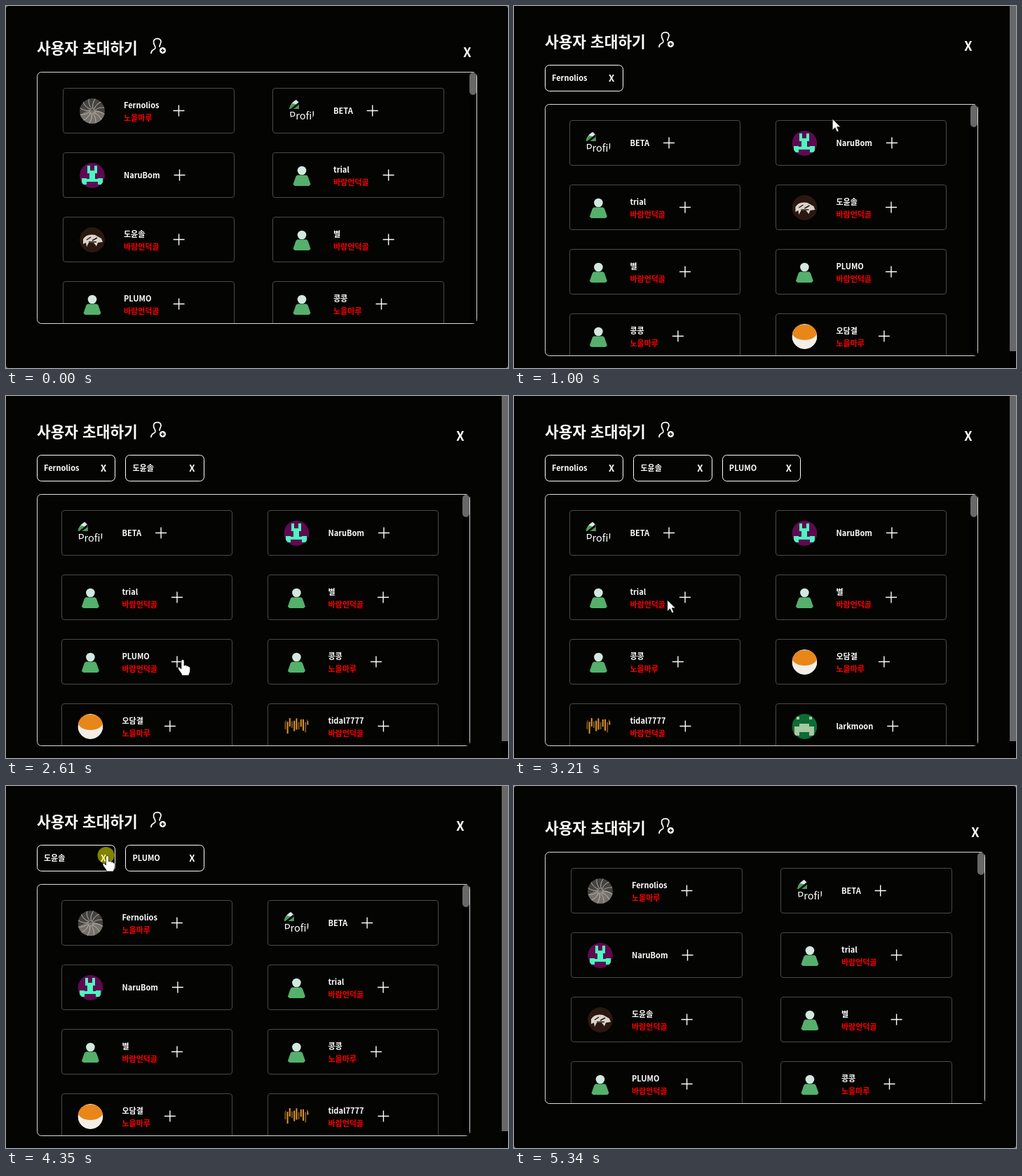
These frames come from a looping animation (716x517 px, 5940 ms). An HTML page:

```html
<!DOCTYPE html>
<html lang="ko">
<head>
<meta charset="utf-8">
<title>사용자 초대하기</title>
<style>
  html, body { margin: 0; width: 100%; height: 100%; overflow: hidden; background: #040402; }
  svg { display: block; }
  text { font-family: "Noto Sans CJK KR", "Noto Sans KR", "Noto Sans CJK", "Noto Sans", sans-serif; fill: #fff; }
  .bold { font-weight: 700; }
  .small { font-size: 11px; }
  .house { fill: #f00; }
  .line { fill: none; stroke: #fff; }
</style>
</head>
<body>
<svg width="716" height="517" viewBox="0 0 716 517">
  <defs><clipPath id="disc"><circle r="18"/></clipPath></defs>
  <g id="page"></g>
  <circle id="press" r="12" fill="#ff0" fill-opacity=".5"/>
  <g id="cursor" fill="#fff" stroke="#000" stroke-width=".6">
    <path id="arrow" d="M0 0V16l3.8-3.6 2.7 6 2.5-1.1-2.6-5.9H11.5z"/>
    <path id="hand" d="M-2 1.5a2 2 0 0 1 4 0V8l1-.3a2 2 0 0 1 2.8 1 2 2 0 0 1 2.8 1 1.7 1.7 0 0 1 2 1.6V15c0 3-1.6 4-1.8 7H-1C-1.5 18-6 15-6.5 12c-.3-2 2-2.3 3-.5L-2 13z"/>
  </g>
</svg>
<script>
const LOOP = 5940, STEP = 66.7, PRESS = 70, ROW = 92;
const $ = id => document.getElementById(id);
const range = (n, f) => Array.from({ length: n }, (_, i) => f(i)).join('');
const rect = (x, y, w, h, attrs = '') => `<rect x="${x}" y="${y}" width="${w}" height="${h}" ${attrs}/>`;
const text = (x, y, str, attrs) => `<text x="${x}" y="${y}" ${attrs}>${str}</text>`;

const pen = document.createElement('canvas').getContext('2d');
pen.font = '700 11px "Noto Sans CJK KR", "Noto Sans KR", "Noto Sans CJK", "Noto Sans", sans-serif';
const widest = (...lines) => Math.max(...lines.map(s => pen.measureText(s).width));

// Pixel avatar: the right half is given, the left half mirrors it
const pixels = (back, fore, half) => `<circle r="18" fill="${back}"/>
  <g fill="${fore}" shape-rendering="crispEdges">${half.map(([x, y, w, h]) => rect(x, y, w, h) + rect(-x - w, y, w, h)).join('')}</g>`;

const avatars = {
  person: `<circle cy="-7" r="6.3" fill="#d3e8e1"/>
    <path d="M-6-.5H6Q8-.5 8.800 2L12.400 12.500Q13 15 10.500 15H-10.500Q-13 15-12.400 12.500L-8.800 2Q-8-.5-6-.5" fill="#55b06c"/>`,
  broken: `<path d="M-18-16h10l4 4v9h-14z" fill="#d8e6ee"/><path d="M-18-3v-4l5-4 9 3v5z" fill="#4a9d58"/>
    <path d="M-16-3L-4-13v4l-8 6z" fill="#040402"/>${text(-18, 12, 'Profile', 'font-size="14.500" font-weight="500"')}`,
  pink: pixels('#5e0a50', '#4df7c0', [[3, -14, 4, 9], [0, -7, 7, 4], [0, -3, 4, 8], [0, 5, 8, 4], [8, 4, 7, 9]]),
  green: pixels('#0d6b35', '#a5c9a0', [[7, -14, 4, 4], [0, -4, 7, 4], [0, 0, 14, 8], [7, 8, 7, 5]]),
  grey: `<circle r="18" fill="#45433f"/><path d="M-18 6Q0-8 18 4V18H-18z" fill="#76726b"/>
    <g fill="none" stroke="#c4c0b8" stroke-width=".8">${range(12, i => `<path transform="rotate(${i * 30})" d="M0 3Q6 8 5 18"/>`)}</g>`,
  brown: `<circle r="18" fill="#2b1810"/><path d="M-13-1Q-8-9 4-7L13-2 15 3 8 4 6 9 2 4-5 4-8 10-9 4-13 6z" fill="#d9d4cc"/>
    <path d="M-8 0L-2-4M0 1L7-3M-5 3H6" stroke="#2b1810" stroke-width="1.500"/>`,
  orange: '<circle r="18" fill="#f4efe6"/><ellipse cy="-6" rx="18" ry="11" fill="#e8861a"/>',
  gold: range(11, i => rect(-17 + i * 3.2, -9 + 3 * Math.sin(i * 2.3), 2, 13 + 4 * Math.sin(i * 1.7), `fill="${i % 3 ? '#d9952f' : '#7a5220'}"`)),
};

const HILL = '노을마루', WIND = '바람언덕골';
const users = [
  ['Fernolios', HILL, 'grey'], ['BETA', '', 'broken'], ['NaruBom', '', 'pink'], ['trial', WIND, 'person'],
  ['도윤솔', WIND, 'brown'], ['별', WIND, 'person'], ['PLUMO', WIND, 'person'], ['콩콩', HILL, 'person'],
  ['오담결', HILL, 'orange'], ['tidal7777', WIND, 'gold'], ['larkmoon', '', 'green'],
];

function card([name, house, avatar], x, y, w, inset) {
  const tx = inset + 45, plus = tx + widest(name, house) + 28;
  return `<g transform="translate(${x} ${y})">
    ${rect(.5, .5, w, 64, 'rx="3.500" fill="none" stroke="#4a4a4a"')}
    <g transform="translate(${inset} 33)" clip-path="url(#disc)">${avatars[avatar]}</g>
    ${text(tx, house ? 29 : 37, name, 'class="bold small"')}
    ${text(tx, 47, house, 'class="bold small house"')}
    <path class="line" stroke-width="1.400" d="M${plus - 8} 32.500h16m-8-8v16"/>
  </g>`;
}

function chip([name], i) {
  const x = 44 + i * 126.4, left = Math.round(x), right = Math.round(x + 112.4);
  return rect(left + .5, 84.5, right - left - 1, 37, 'rx="6" class="line"')
    + text(x + 10, 107, name, 'class="bold small"')
    + text(x + 95, 108, 'X', 'class="bold" font-size="13" text-anchor="middle"');
}

function drawPage(picked) {
  const open = picked.length > 0;
  const top = open ? 140 : 94, right = open ? 662 : 672;
  const [x1, x2, w, inset] = open ? [79, 373, 243, 41.4] : [81, 380, 244, 42];
  const shown = users.filter((_, i) => !picked.includes(i)).slice(0, 8);
  const backdrop = open
    ? rect(707, 0, 9, 517, 'fill="#000"') + rect(707, 0, 9, 493, 'fill="#686868"')
    : rect(0, 0, 716, 517, 'fill="#777"') + rect(0, 0, 716, 517, 'rx="4" fill="#040402"');
  $('page').innerHTML = backdrop + `
    <g transform="translate(0 ${open ? -9 : 0})">
      ${text(44, 67.5, '사용자 초대하기', 'class="bold" font-size="21.400"')}
      <path class="line" stroke-width="1.700" stroke-linecap="round" d="M207 67.500C207 62 212 63 213 60C213.500 57 210 55 210.500 51C211 45.500 220 45 221 50.500C221.500 53 219 55 219 58"/>
      <circle cx="223.500" cy="63.500" r="4.500" fill="#fff"/>
      <path d="M221 63.500h5m-2.500-2.500v5" stroke="#040402" stroke-width="1.300"/>
      ${text(right - 14, 73, 'X', 'class="bold" font-size="18" text-anchor="middle"')}
    </g>
    ${picked.map((u, i) => chip(users[u], i)).join('')}
    <svg y="${top + 1}" width="${right - 1}" height="358">
      ${shown.map((u, i) => card(u, i % 2 ? x2 : x1, 22 + (i >> 1) * ROW, w, inset)).join('')}
    </svg>
    ${rect(44.5, top + .5, right - 45, 359, 'rx="6" class="line" stroke-opacity=".85"')}
    ${rect(right - 11, top + 1, 10, 358, 'fill="#010101"')}
    ${rect(right - 11, top + 1, 10, 32, 'rx="5" fill="#686868"')}`;
}

// Each click: time of press, time the page follows, user toggled
const clicks = [[730, 800, 0], [1330, 1400, 4], [2950, 3010, 6], [3880, 4020, 0], [4350, 4480, 4], [4800, 4940, 6]];

// Each move: start, arrival, end of hover, destination, sideways arc
const entry = [618, 489];
const moves = [
  { from: 70, to: 600, hover: 800, at: [246, 149], arc: 0 },
  { from: 800, to: 1270, hover: 1940, at: [541, 291], arc: .5 },
  { from: 1940, to: 2600, hover: 3010, at: [252, 377], arc: 0 },
  { from: 3080, to: 3670, hover: 4940, at: [144.5, 100], arc: 0 },
  { from: 5070, to: 5340, hover: 0, at: [347, 460], arc: 0 },
];
const easeOut = k => 1 - (1 - k) ** 1.6;

const pickedAt = t => clicks.filter(c => c[1] <= t).reduce(
  (list, [, , u]) => list.includes(u) ? list.filter(v => v !== u) : [...list, u], []);

// The pointer was sampled about 15 times a second
function pointerAt(t) {
  const q = Math.floor((t + 6) / STEP) * STEP;
  const i = Math.max(0, moves.findLastIndex(m => m.from <= q));
  const { from, to, at, arc } = moves[i], [x, y] = i ? moves[i - 1].at : entry;
  const s = easeOut(Math.min(1, Math.max(0, (q - from) / (to - from))));
  const dx = at[0] - x, dy = at[1] - y, side = 2 * s * (1 - s) * arc;
  return [x + dx * s + dy * side, y + dy * s - dx * side];
}

const show = (id, on) => $(id).style.display = on ? '' : 'none';
let drawn;
const start = performance.now();

function tick() {
  const t = (performance.now() - start) % LOOP;
  const picked = pickedAt(t), key = picked.join();
  if (key !== drawn) drawPage(picked);
  drawn = key;
  const [x, y] = pointerAt(t), hand = moves.some(m => t >= m.to && t < m.hover);
  $('cursor').setAttribute('transform', `translate(${x} ${y})`);
  $('press').setAttribute('transform', `translate(${x - 2} ${y - 1})`);
  show('cursor', t >= 70 && t < 5335);
  show('hand', hand);
  show('arrow', !hand);
  show('press', clicks.some(([p]) => t >= p && t < p + PRESS));
  requestAnimationFrame(tick);
}
tick();
</script>
</body>
</html>
```
